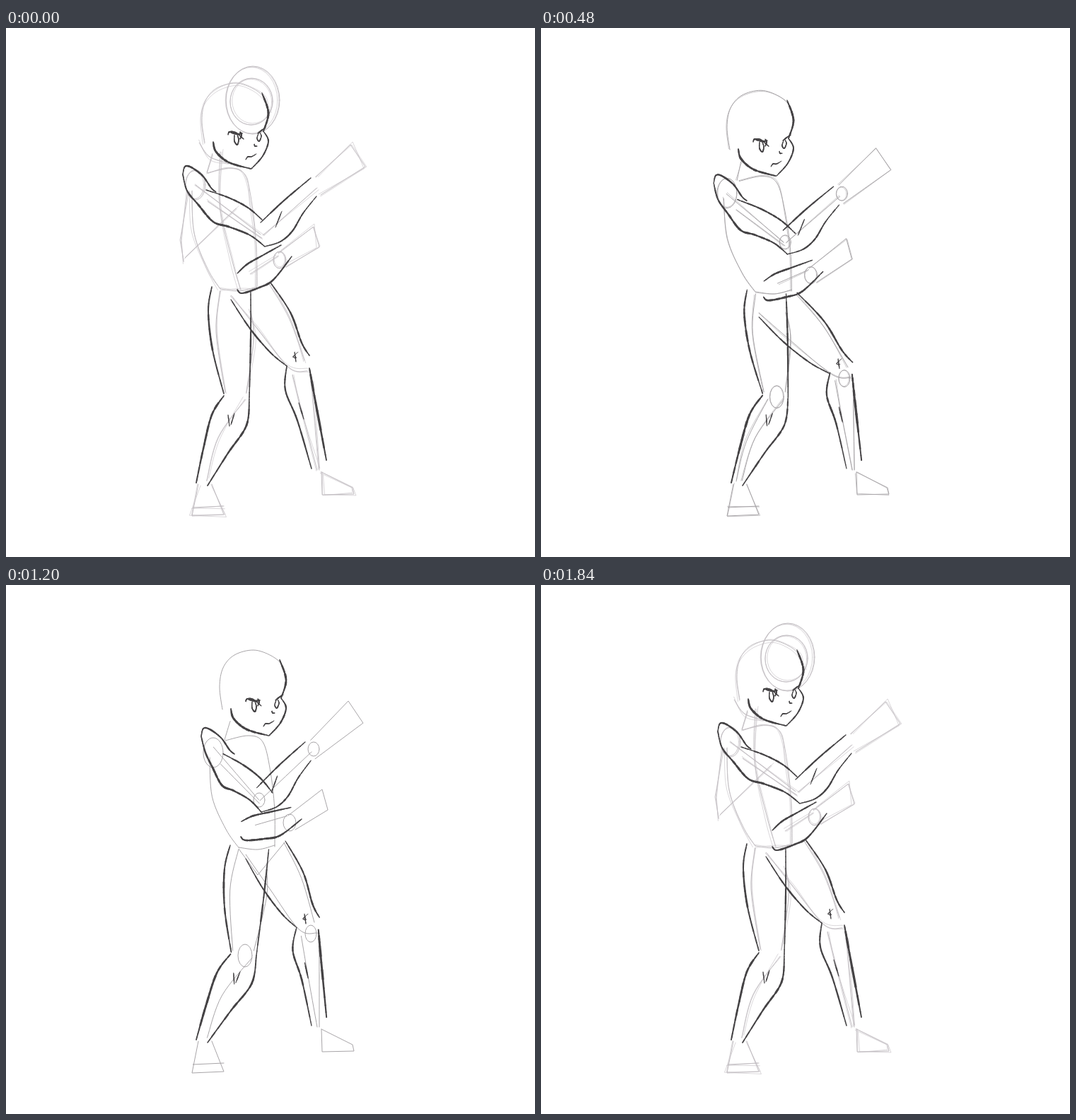
These frames come from a looping animation (748x748 px, 1.92 s). An HTML page with a canvas:

```html
<!DOCTYPE html>
<html lang="en">
<head>
<meta charset="utf-8">
<title>Idle stance sketch</title>
<style>
html, body { margin: 0; width: 100%; height: 100%; overflow: hidden; background: #fff; }
canvas { display: block; width: 100vw; height: 100vh; }
</style>
</head>
<body>
<canvas id="stage" width="748" height="748"></canvas>
<script>
const ctx = document.getElementById('stage').getContext('2d');
const LOOP = 1920, STEP = 80;
const KEY_TIMES = [0, 320, 720, 1040, 1200, 1520, 1840];

const nums = text => text.trim().split(/\s+/).map(Number);
const mix = (a, b, k) => a + (b - a) * k;
const clamp = v => Math.max(0, Math.min(1, v));

// A joint has a rest place and its x y offset at each inner key time.
const joints = {};
function joint(name, x, y, offsets) {
  const list = offsets ? nums(offsets) : Array(10).fill(0);
  joints[name] = { x, y, track: [0, 0, ...list, 0, 0] };
}

joint('head', 330, 150, '-14 11 -14 9 -4 -1 25 14 28 9');
joint('chest', 270, 215, '-5 14 -5 8 3 5 25 15 10 2');
joint('shoulder', 270, 215, '-5 14 -7 10 3 1 26 7 34 5');
joint('elbow', 366, 300, '-20 14 -14 6 -4 -5 -5 12 5 11');
joint('crook', 362, 271, '0 25 -6 11 14 1 15 23 22 22');
joint('wrist', 435, 225, '-23 17 -9 5 0 -2 -8 10 1 2');
joint('tip', 498, 180, '-7 5 -23 4 -9 6 -3 -1 5 -5');
joint('lowElbow', 327, 358, '-16 15 -7 3 5 -14 5 -14 4 -2');
joint('lowWrist', 396, 315, '-9 26 0 15 10 3 14 8 14 15');
joint('lowTip', 439, 296, '-5 17 -1 16 7 8 12 8 9 5');
joint('pelvis', 318, 369, '0 4 1 4 9 1 26 2 26 3');
joint('farHip', 374, 360, '-7 16 -19 12 -2 2 21 2 14 -8');
joint('crotch', 318, 384, '-13 20 -5 32 -3 2 21 3 22 2');
joint('knee', 326, 520, '7 0 3 -1 8 2 10 2 18 2');
joint('farKnee', 413, 471, '10 10 15 9 -3 5 14 7 23 4');
joint('foot', 277, 644);
joint('farFoot', 443, 615);

// Each line hangs between two joints and follows both.
const inks = [], guides = [], ovals = [];
const ink = (a, b, width, text) => inks.push({ a, b, width, pts: nums(text) });
const guide = (a, b, text, hard = false, keys = '012345') =>
  guides.push({ a, b, hard, keys, pts: nums(text) });
const oval = (a, x, y, rx, ry, keys = '12345') => ovals.push({ a, x, y, rx, ry, keys });

const face = (width, text) => ink('head', 'head', width, text);
face(3, '293 161 297 175 315 190 346 199');
face(2.8, '362 92 371 120 364 146');
face(2.2, '364 146 371 160 363 181 347 199');
face(2, '314 151 316 147 325 148 336 157');
face(2.3, '318 148 327 150 334 149');
face(2, '331 147 333 151 331 157');
face(1.9, '323 151 323 160 327 165 329 158 327 151');
face(1.9, '356 149 361 145 367 141');
face(1.6, '357 149 355 156 358 160 361 153 359 148');
face(1.5, '351 164 352 167 355 167');
face(1.5, '339 186 342 182 347 182 354 178');

ink('shoulder', 'shoulder', 2.3, '250 207 253 196 262 197 278 209 290 226 297 232');
ink('shoulder', 'elbow', 2.7, '250 207 256 230 272 250 293 274 315 281 345 293 366 309');
ink('shoulder', 'crook', 2.3, '283 229 315 240 342 254 362 271');
ink('elbow', 'wrist', 2.2, '360 275 393 244 431 212');
ink('elbow', 'wrist', 2.1, '366 309 388 302 405 287 420 262 439 238');
ink('elbow', 'wrist', 1.6, '390 259 381 282');
ink('lowElbow', 'lowWrist', 2.4, '327 347 341 334 362 322 389 307');
ink('lowElbow', 'lowWrist', 2.7, '327 370 334 375 358 367 378 356 404 323');

ink('pelvis', 'knee', 2.5, '291 366 286 400 292 455 308 517');
ink('knee', 'foot', 3, '308 520 291 547 279 595 269 643');
ink('pelvis', 'knee', 2.2, '346 372 346 440 344 522');
ink('knee', 'foot', 2.6, '344 522 340 562 314 601 285 647');
ink('farHip', 'farKnee', 2.5, '374 360 402 402 418 445 429 463');
ink('farKnee', 'farFoot', 3.2, '429 481 436 520 453 611');
ink('crotch', 'farKnee', 2.1, '318 384 345 425 374 459 397 478');
ink('farKnee', 'farFoot', 2.4, '397 478 395 512 412 555 432 623');
ink('knee', 'foot', 1.5, '314 547 316 563');
ink('knee', 'foot', 1.5, '323 545 318 561');
ink('farKnee', 'farFoot', 1.8, '414 530 421 553');
ink('farKnee', 'farKnee', 1.6, '408 458 410 472');
ink('farKnee', 'farKnee', 1, '413 458 406 465 411 466');

guide('head', 'head', '281 162 277 130 282 103 298 85 325 78 350 86 366 100 372 122');
guide('head', 'chest', '292 178 284 204');
guide('chest', 'pelvis', '263 230 266 290 285 340 303 369');
guide('chest', 'pelvis', '285 205 318 198 338 208 348 250 354 310 354 368');
guide('shoulder', 'elbow', '268 222 360 292');
guide('shoulder', 'elbow', '285 245 362 297');
guide('elbow', 'wrist', '364 293 440 226');
guide('wrist', 'tip', '438 211 487 165 508 196 445 236', true);
guide('lowElbow', 'lowWrist', '345 348 385 322');
guide('lowWrist', 'lowTip', '385 318 435 281 443 310 395 338', true);
guide('pelvis', 'pelvis', '303 369 330 372 354 366');
guide('pelvis', 'pelvis', '303 371 330 408 368 362', true, '45');
guide('pelvis', 'knee', '303 372 297 430 310 515');
guide('pelvis', 'knee', '346 400 350 440 340 515');
guide('farHip', 'farKnee', '372 362 400 410 422 470');
guide('crotch', 'farKnee', '318 378 355 425 400 480 426 485');
guide('knee', 'foot', '338 525 300 580 284 640');
guide('knee', 'foot', '316 525 288 585 276 640', false, '1235');
guide('farKnee', 'farFoot', '405 490 418 540 440 625');
guide('farKnee', 'farFoot', '432 500 443 625');
guide('foot', 'foot', '272 645 263 690 308 688 291 645', true);
guide('foot', 'foot', '264 678 308 676', true);
guide('farFoot', 'farFoot', '446 628 447 660 492 659 490 650 446 628', true);

// Loose construction marks seen only in the opening pose.
guide('head', 'head', '273 162 288 182 315 192', false, '0');
guide('chest', 'chest', '257 230 247 300 251 330', true, '0');
guide('chest', 'chest', '253 325 325 255', true, '0');
guide('chest', 'chest', '303 175 302 250 320 330 332 370', false, '0');
oval('head', 349, 102, 38, 48, '0');
oval('head', 347, 104, 30, 33, '0');

oval('chest', 268, 222, 14, 21, '012345');
oval('elbow', 363, 292, 8, 10);
oval('wrist', 443, 222, 8, 10);
oval('lowWrist', 387, 328, 9, 12, '012345');
oval('pelvis', 327, 388, 16, 18, '23');
oval('knee', 328, 522, 10, 16);
oval('farKnee', 417, 486, 8, 12);
oval('foot', 282, 637, 8, 11, '23');
oval('farFoot', 446, 621, 9, 12, '23');

function makeRandom(seed) {
  return () => (seed = (seed * 16807) % 2147483647) / 2147483647;
}

// Catmull-Rom samples through a flat point list.
function curve(p, n = 8) {
  const out = [], last = p.length / 2 - 1;
  const at = (i, k) => p[Math.max(0, Math.min(last, i)) * 2 + k];
  for (let i = 0; i < last; i++) {
    for (let j = 0; j < n; j++) {
      const u = j / n;
      for (const k of [0, 1]) {
        const a = at(i - 1, k), b = at(i, k), c = at(i + 1, k), d = at(i + 2, k);
        out.push(b + u / 2 * (c - a + u * (2 * a - 5 * b + 4 * c - d + u * (3 * (b - c) + d - a))));
      }
    }
  }
  out.push(at(last, 0), at(last, 1));
  return out;
}

function trace(p) {
  ctx.beginPath();
  for (let i = 0; i < p.length; i += 2) ctx.lineTo(p[i], p[i + 1]);
  ctx.stroke();
}

// Tapered pencil stroke with a little uneven pressure.
function inkLine(p, width, rnd) {
  const s = curve(p), count = s.length / 2 - 1;
  for (let i = 0; i < count; i++) {
    const press = 0.55 + 0.45 * Math.sin(Math.PI * (i + 0.5) / count);
    ctx.lineWidth = width * press * (0.8 + 0.4 * rnd());
    trace(s.slice(i * 2, i * 2 + 4));
  }
}

function bend({ a, b, pts }, moved) {
  const from = joints[a], to = joints[b], da = moved[a], db = moved[b];
  const bx = to.x - from.x, by = to.y - from.y, len = bx * bx + by * by || 1;
  const out = [];
  for (let i = 0; i < pts.length; i += 2) {
    const u = clamp(((pts[i] - from.x) * bx + (pts[i + 1] - from.y) * by) / len);
    out.push(pts[i] + mix(da[0], db[0], u), pts[i + 1] + mix(da[1], db[1], u));
  }
  return out;
}

function drawGuides(moved, key, rnd) {
  const passes = key === 0 ? 3 : key === 4 ? 1 : 2;
  const jitter = (p, size) => p.map(v => v + (rnd() - 0.5) * size);
  ctx.strokeStyle = key === 0 ? '#c3bfc3' : '#a8a5a8';
  ctx.lineWidth = 1;
  for (let n = 0; n < passes; n++) {
    ctx.globalAlpha = n ? 0.6 : 1;
    for (const g of guides.filter(g => g.keys.includes(key))) {
      const p = jitter(bend(g, moved), n * 4);
      trace(g.hard ? p : curve(p));
    }
    for (const o of ovals.filter(o => o.keys.includes(key))) {
      const [dx, dy] = moved[o.a];
      const [x, y] = jitter([o.x + dx, o.y + dy], n * 2);
      ctx.beginPath();
      ctx.ellipse(x, y, o.rx - n * 0.6, o.ry - n * 0.6, 0, 0, 7);
      ctx.stroke();
    }
  }
  ctx.globalAlpha = 1;
}

function draw(t) {
  let i = KEY_TIMES.length - 2;
  while (KEY_TIMES[i] > t) i--;
  const k = clamp((t - KEY_TIMES[i]) / (KEY_TIMES[i + 1] - KEY_TIMES[i]));
  const key = (k > 0.5 ? i + 1 : i) % 6;
  const moved = {};
  for (const name in joints) {
    const tr = joints[name].track;
    moved[name] = [0, 1].map(c => mix(tr[i * 2 + c], tr[i * 2 + 2 + c], k));
  }
  const rnd = makeRandom(t + 977);

  ctx.fillStyle = '#fff';
  ctx.fillRect(0, 0, 748, 748);
  ctx.lineCap = ctx.lineJoin = 'round';
  drawGuides(moved, key, rnd);
  ctx.strokeStyle = '#454345';
  for (const line of inks) inkLine(bend(line, moved), line.width, rnd);
}

// Two drawings are held for a double beat; the last equals the first.
function heldTime(ms) {
  const t = Math.floor((ms % LOOP) / STEP) * STEP;
  if (t === 1840) return 0;
  return t === 1280 || t === 1760 ? t - STEP : t;
}

let shown = -1;
const start = performance.now();
function tick() {
  const t = heldTime(performance.now() - start);
  if (t !== shown) draw(shown = t);
  requestAnimationFrame(tick);
}
tick();
</script>
</body>
</html>
```
